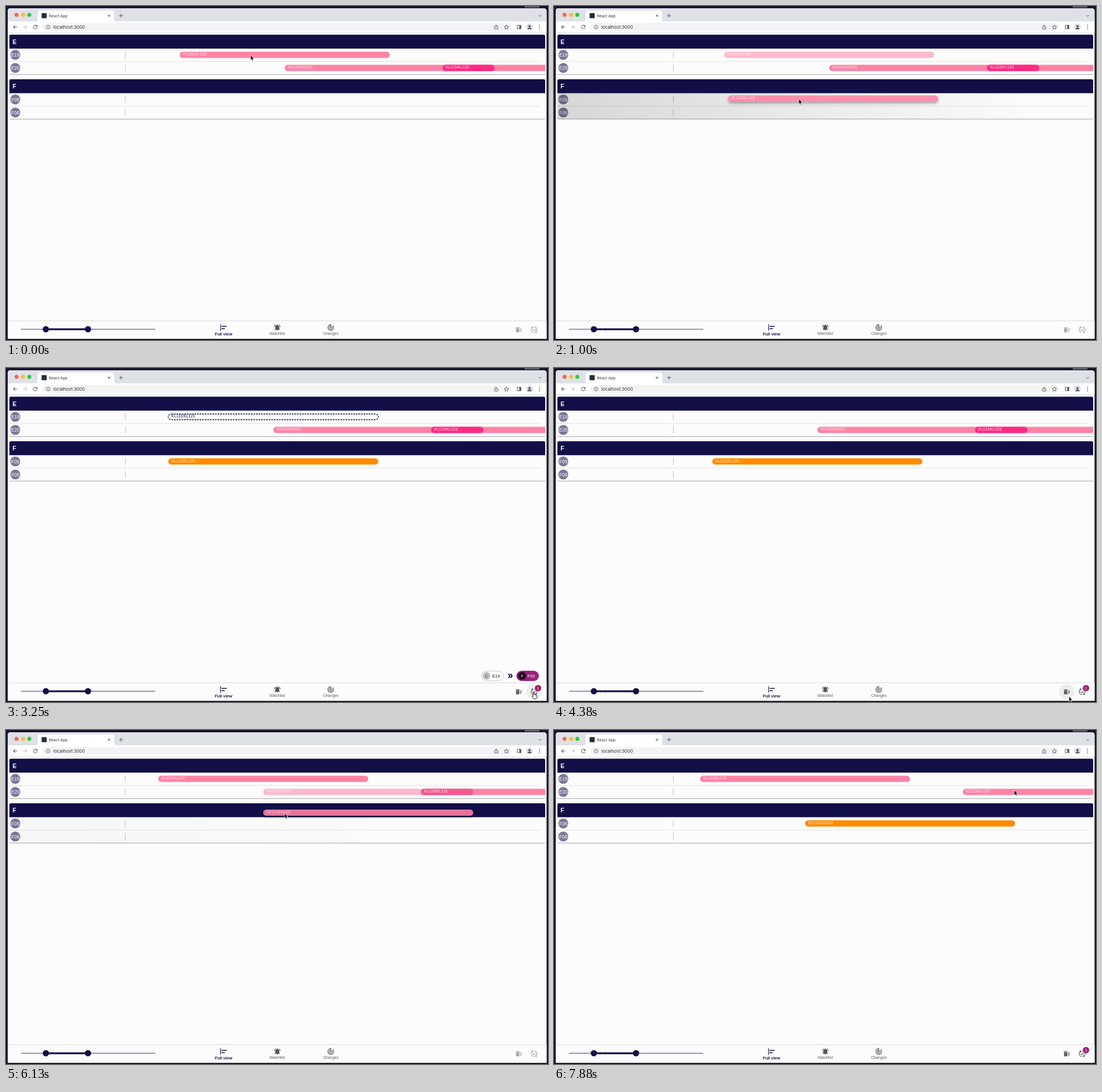
These frames come from a looping animation (952 px wide and 588 px high, 8 s). An HTML page:

```html
<!DOCTYPE html>
<html lang="en">
<head>
<meta charset="utf-8">
<title>Gate planner</title>
<style>
  html, body { margin: 0; width: 100%; height: 100%; overflow: hidden; background: #18132e; }
  svg { display: block; width: 952px; height: 588px; font-family: "Liberation Sans", Arial, sans-serif; }
  .ui { font-family: Inter, sans-serif; fill: #303134; }
  .mid { text-anchor: middle; }
  .line { fill: none; stroke: #55585c; stroke-width: 1; }
  .label { font-size: 6.6px; letter-spacing: .1px; }
</style>
</head>
<body>
<svg viewBox="0 0 952 588">
  <defs>
    <linearGradient id="fade">
      <stop offset="0" stop-opacity=".15"/>
      <stop offset=".13" stop-opacity=".125"/>
      <stop offset=".9" stop-opacity="0"/>
    </linearGradient>
    <filter id="lift" x="-5%" y="-80%" width="110%" height="300%">
      <feDropShadow dx="0" dy="2.5" stdDeviation="2" flood-opacity=".4"/>
    </filter>
    <clipPath id="board"><rect x="6" y="48" width="941" height="506"/></clipPath>
  </defs>

  <!-- Browser window -->
  <rect x="911" width="26" height="3" fill="#5c5a66"/>
  <path d="M3 586V9q0-5 5-5H944q5.500 0 5.500 5V586z" fill="#fcfcfc"/>
  <path d="M3 27V9q0-5 5-5H944q5.500 0 5.500 5V27z" fill="#dee1e6"/>
  <path d="M52 27q3.500 0 3.500-4V12q0-4 4-4H186q4 0 4 4V23q0 4 3.500 4z" fill="#fff"/>
  <circle cx="18.500" cy="15.500" r="3.500" fill="#fe5f57"/>
  <circle cx="30" cy="15.500" r="3.500" fill="#febc2e"/>
  <circle cx="41" cy="15.500" r="3.500" fill="#28c840"/>
  <rect x="62.500" y="12.500" width="9" height="9" rx="1" fill="#20313a"/>
  <text class="ui" x="75.500" y="19.500" font-size="6.700">React App</text>
  <path class="line" d="M179 15l4 4m0-4l-4 4M198.500 17h7m-3.500-3.500v7M935 16l2.500 2.500 2.500-2.500"/>
  <rect x="3" y="27" width="946.500" height="19.500" fill="#fff"/>
  <rect x="64" y="30" width="824" height="14" rx="7" fill="#f1f3f4"/>
  <path d="M3 46.800H949.500" stroke="#dcdde0" stroke-width=".8"/>
  <text class="ui" x="83" y="39.900" font-size="7.900">localhost:3000</text>
  <g class="line">
    <circle cx="74" cy="37" r="3.300" stroke-width=".8"/>
    <path d="M74 36.500v2.300m0-4v.9" stroke-width=".8"/>
    <path d="M859.500 36h-1.500v4.500h6v-4.500h-1.500M861 38.500v-5m-1.700 1.700l1.700-1.700 1.700 1.700" stroke-width=".9"/>
    <path d="M879 33.200l1.100 2.700 2.900.2-2.200 1.900.7 2.800-2.500-1.500-2.500 1.500.7-2.800-2.200-1.900 2.900-.2z" stroke-width=".9"/>
    <rect x="898" y="34" width="6.500" height="6" stroke-width="1"/>
  </g>
  <path d="M901.500 34h3v6h-3zM936.300 33h1.500v1.500h-1.500zm0 3.200h1.500v1.500h-1.500zm0 3.200h1.500v1.500h-1.500z" fill="#55585c"/>
  <circle cx="919.500" cy="37" r="6" fill="#d9dce6"/>
  <path d="M916 40.500q0-2.500 3.500-2.500t3.500 2.500z" fill="#3c4257"/>
  <circle cx="919.500" cy="35.500" r="1.800" fill="#3c4257"/>

  <g id="sections"></g>
  <rect id="zone" x="6" y="153" width="941" height="46" fill="url(#fade)"/>
  <g id="bars" clip-path="url(#board)"></g>

  <!-- Bottom bar -->
  <rect x="3" y="553.500" width="946.500" height="1.500" fill="#e6e6e6"/>
  <rect x="3" y="555" width="946.500" height="31" fill="#fcfcfc"/>
  <rect x="26" y="568" width="236.500" height="2.200" rx="1" fill="#9f9dbf"/>
  <rect x="70" y="567.500" width="74" height="3.200" fill="#120f47"/>
  <rect x="84.500" y="568.500" width="1" height="1" fill="#9f9dbf"/>
  <circle cx="70" cy="569" r="5.500" fill="#120f47"/>
  <circle cx="144" cy="569" r="5.500" fill="#120f47"/>
  <g class="mid" font-size="6.800" fill="#5c5c5c">
    <text x="382" y="579.500" font-size="7.900" fill="#120f47" stroke="#120f47" stroke-width=".2">Full view</text>
    <text x="476.500" y="578.800">Watchlist</text>
    <text x="570.500" y="578.800">Changes</text>
  </g>
  <circle id="hoverDelete" cx="901" cy="570" r="13.500" fill="#eeeeee"/>
  <circle id="hoverApply" cx="927.500" cy="570" r="13.500" fill="#eeeeee"/>
  <g id="icons"></g>
  <g id="badge">
    <circle cx="934.500" cy="563.500" r="5.600" fill="#9c1f78"/>
    <text class="mid" x="934.500" y="565.900" font-size="6.800" fill="#fff">1</text>
  </g>

  <g id="chips" font-size="7.500">
    <rect x="835" y="533.500" width="39" height="17" rx="8.500" fill="#fcfcfc" stroke="#bdbdbd" stroke-width=".8"/>
    <circle cx="844" cy="542" r="6.700" fill="#bdbdbd"/>
    <text class="mid" x="844" y="544.500" font-size="6.800" fill="#666">E</text>
    <text x="854" y="544.700" fill="#222">E19</text>
    <rect x="896.500" y="533" width="39.500" height="18" rx="9" fill="#9c1f78"/>
    <circle cx="906.500" cy="542" r="6.700" fill="#140a18"/>
    <text class="mid" x="906.500" y="544.500" font-size="6.800" fill="#fff">F</text>
    <text x="916" y="544.700" fill="#fff">F05</text>
  </g>

  <path id="arrow" d="M0 0V9L2 7.200 3.400 10.300 4.900 9.600 3.500 6.600H6.200z" fill="#000" stroke="#fff" stroke-width=".7"/>
  <path id="hand" d="M-1 1q0-1 .9-1t.9 1V4q1.500-.5 1.700.5 1.500-.4 1.600.6 1.400-.2 1.400 1V8q0 2.500-1.500 3.500H-.3Q-2 9.500-3.200 7.200q0-1.200 1-1L-1 7.200z" fill="#fff" stroke="#000" stroke-width=".8"/>
</svg>
<script>
const LOOP = 8000, NAVY = '#120f47', PINK = '#ff82a6', ORANGE = '#ff8c00';
const $ = id => document.getElementById(id);

function add(parent, tag, attrs, text) {
  const el = document.createElementNS('http://www.w3.org/2000/svg', tag);
  for (const k in attrs) el.setAttribute(k, attrs[k]);
  if (text) el.textContent = text;
  return parent.appendChild(el);
}
const show = (el, on) => el.setAttribute('visibility', on ? 'visible' : 'hidden');
const move = (el, x, y) => el.setAttribute('transform', `translate(${x} ${y})`);

// Sections with two gates each
function section(name, top, gates) {
  const g = $('sections');
  add(g, 'rect', { x: 6, y: top + 3, width: 941, height: 67.8, rx: 2.5, fill: '#b4b4b4' });
  add(g, 'rect', { x: 6, y: top + 3, width: 941, height: 66.5, rx: 2, fill: '#fcfcfc' });
  add(g, 'path', { d: `M6 ${top + 24.5}v-22q0-2.500 2.500-2.500h936q2.500 0 2.500 2.500v22z`, fill: NAVY });
  add(g, 'text', { x: 11.5, y: top + 16.3, 'font-size': 10.5, 'font-weight': 'bold', fill: '#fff' }, name);
  add(g, 'path', { d: `M6 ${top + 47.2}H938`, stroke: '#dedede', 'stroke-width': .9 });
  gates.forEach((gate, i) => {
    const y = top + 35.5 + 23 * i;
    add(g, 'circle', { cx: 16.3, cy: y, r: 8.7, fill: '#7a7899' });
    add(g, 'text', { class: 'mid', x: 16.3, y: y + 3, 'font-size': 8.5, fill: '#fff' }, gate);
    add(g, 'path', { d: `M209.500 ${y - 5.5}v12`, stroke: '#a5a5a5', 'stroke-width': 1, 'stroke-dasharray': '2 1' });
  });
}
section('E', 50.5, ['E19', 'E20']);
section('F', 129, ['F05', 'F06']);

// Bars are drawn around their vertical centre
function bar(label, fill, width = 369, ink = '#ffffffe0') {
  const g = add($('bars'), 'g', {});
  g.box = add(g, 'rect', { y: -5.6, width, height: 11.2, rx: 5.6, fill });
  add(g, 'text', { class: 'label', x: 5.8, y: 1.3, fill: ink }, label);
  return g;
}
const KL = 'KL123/KL123', HV = 'HV123/HV922';
const klBar = bar(KL, PINK), klMoved = bar(KL, ORANGE), klOld = bar(KL, 'none', 369, NAVY);
const hvBar = bar(HV, PINK), nextBar = bar(KL, PINK), clash = bar(KL, '#ff2b85', 92);
const hvMoved = bar(HV, ORANGE), klGhost = bar(KL, PINK), hvGhost = bar(HV, PINK);
for (const [k, v] of [['stroke', NAVY], ['stroke-width', 1.3], ['stroke-dasharray', '3 1.5'], ['y', -5], ['height', 10]])
  klOld.box.setAttribute(k, v);
for (const g of [klGhost, hvGhost]) {
  g.setAttribute('opacity', .88);
  g.setAttribute('filter', 'url(#lift)');
}

function icon(parent, cx, cy, size, d, fill, flip = 1) {
  const s = size / 24;
  return add(parent, 'path', { d, fill, transform: `translate(${cx} ${cy}) scale(${s * flip} ${s}) translate(-12 -12)` });
}
const icons = $('icons');
const BACK = 'M20 11H7.830l5.590-5.590L12 4l-8 8 8 8 1.410-1.410L7.830 13H20z';
icon(icons, 16, 37, 10.5, BACK, '#4a4d51');
icon(icons, 33.5, 37, 10.5, BACK, '#b9bbbe', -1);
icon(icons, 51.5, 37, 11, 'M17.650 6.350A8 8 0 1 0 19.730 14h-2.080A6 6 0 1 1 16.220 7.780L13 11h7V4z', '#4a4d51');
icon(icons, 382, 566, 13.7, 'M4 22H2V2h2zM22 7H6v3h16zM16 14H6v3h10z', NAVY);
icon(icons, 476.5, 566, 13.7, 'M7.600 4.100L6.150 2.650A10 10 0 0 0 2 10.500h2a8 8 0 0 1 3.600-6.400zM20 10.500h2a10 10 0 0 0-4.150-7.850L16.400 4.100a8 8 0 0 1 3.600 6.400zM18 11c0-3.100-1.600-5.600-4.500-6.300V4a1.500 1.500 0 0 0-3 0v.7C7.600 5.400 6 7.900 6 11v5l-2 2v1h16v-1l-2-2zM10 20a2 2 0 0 0 4 0z', '#555');
icon(icons, 570.5, 566, 13.7, 'M19.070 4.930l-1.410 1.410A8 8 0 1 1 11 4.070v2.020A6 6 0 1 0 16.240 7.760l-1.410 1.410A4 4 0 1 1 11 8.140v2.140a2 2 0 1 0 2 0V2h-1a10 10 0 1 0 7.070 2.930z', '#555');
const sweep = icon(icons, 901, 570, 13.7, 'M15 16h4v2h-4zm0-8h7v2h-7zm0 4h6v2h-6zM3 18a2 2 0 0 0 2 2h6a2 2 0 0 0 2-2V8H3zM14 5h-3l-1-1H6L5 5H2v2h12z');
const apply = icon(icons, 927.7, 570, 13.7, 'M17.660 9.530l-7.070 7.070-4.240-4.240 1.410-1.410 2.830 2.830 5.660-5.660zM4 12c0-2.330 1.020-4.420 2.620-5.880L9 8.500v-6H3l2.200 2.200A10 10 0 0 0 11 21.950v-2.020A8 8 0 0 1 4 12zm18 0a10 10 0 0 0-9-9.950v2.020A8 8 0 0 1 17.380 17.880L15 15.500v6h6l-2.200-2.200A10 10 0 0 0 22 12z');
icon($('chips'), 885.5, 542, 12.5, 'M15.500 5H11l5 7-5 7h4.500l5-7zM8.500 5H4l5 7-5 7h4.500l5-7z', NAVY);

// Pointer path: time, x, y
const PATH = [
  [0, 429.5, 86.5], [130, 429.5, 88], [500, 429.5, 152.5], [850, 430, 163], [1250, 430, 165],
  [1950, 928, 598], [2250, 928, 598], [2600, 927, 571], [3600, 927, 571], [4150, 906, 580],
  [4380, 904.5, 578], [4550, 901, 569], [4750, 901, 569], [5300, 489, 106], [5700, 489, 106],
  [6130, 489, 146.5], [6450, 489, 164], [6950, 489, 165], [7700, 808.5, 106], [LOOP, 808.5, 106]
];
function pointer(t) {
  const i = PATH.findIndex(p => p[0] > t), [t0, x0, y0] = PATH[i - 1], [t1, x1, y1] = PATH[i];
  const u = (t - t0) / (t1 - t0), e = u * u * (3 - 2 * u);
  return [x0 + (x1 - x0) * e, y0 + (y1 - y0) * e];
}
const ramp = (t, a, b) => Math.min(1, Math.max(0, (t - a) / (b - a)));
const pulse = (t, a, b, c, d) => ramp(t, a, b) - ramp(t, c, d);
const within = (t, a, b) => t >= a && t < b;

const E19 = 86, E20 = 109, F05 = 164.5;

function draw(t) {
  const shift = -t * .00616, kx = 305 + shift, hx = 489.5 + shift, nx = 766.5 + shift;
  const [px, py] = pointer(t);
  const dragKl = within(t, 120, 1060), dragHv = within(t, 5740, 6700);
  const klChanged = within(t, 1060, 4680), hvChanged = t >= 6700, changed = klChanged || hvChanged;
  const review = within(t, 2560, 3740);

  move(klBar, kx, E19);
  move(klOld, kx, E19);
  move(klMoved, kx, F05);
  move(hvBar, hx, E20);
  move(hvMoved, hx, F05);
  move(nextBar, nx, E20);
  move(clash, nx, E20);
  move(klGhost, 305.8, py - .5);
  move(hvGhost, 451.7, py - 1);

  show(klBar, !klChanged);
  show(klMoved, klChanged);
  show(klOld, review);
  show(hvBar, !hvChanged);
  show(clash, !hvChanged);
  show(hvMoved, hvChanged);
  show(klGhost, dragKl);
  show(hvGhost, dragHv);
  klBar.setAttribute('opacity', dragKl ? .55 : 1);
  hvBar.setAttribute('opacity', dragHv ? .55 : 1);
  clash.box.setAttribute('fill', dragHv ? '#f5578f' : '#ff2b85');
  $('zone').setAttribute('opacity', pulse(t, 300, 500, 1060, 1300) + pulse(t, 6080, 6400, 6700, 6930));

  show($('badge'), changed);
  show($('chips'), review);
  show($('hoverApply'), within(t, 2480, 3820));
  show($('hoverDelete'), within(t, 3980, 4860));
  for (const el of [sweep, apply]) el.setAttribute('fill', changed ? '#5a5a5a' : '#a8a8a8');

  const onButton = within(t, 2480, 3820);
  show($('hand'), onButton);
  show($('arrow'), !onButton);
  move($('hand'), px, py);
  move($('arrow'), px, py);
}

function tick() {
  draw(performance.now() % LOOP);
  requestAnimationFrame(tick);
}
tick();
</script>
</body>
</html>
```
